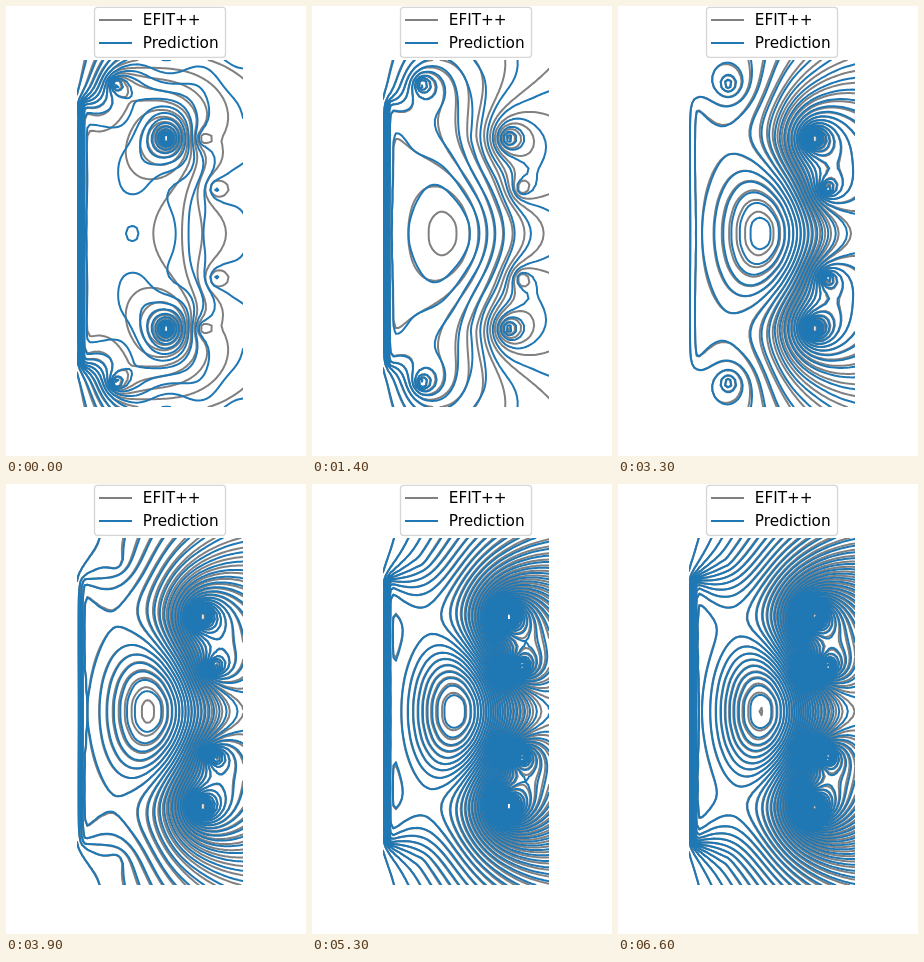
An HTML page with a canvas for the animation above (6.7 s loop, 300 by 450 pixels).

```html
<!DOCTYPE html>
<html lang="en">
<head>
<meta charset="utf-8">
<title>Flux contours</title>
<style>
  html, body { margin: 0; width: 100%; height: 100%; overflow: hidden; background: #fff; }
  canvas, svg { position: absolute; left: 0; top: 0; width: 300px; height: 450px; }
  text { font: 15.28px "DejaVu Sans", sans-serif; }
</style>
</head>
<body>
<canvas id="plot" width="300" height="450"></canvas>
<svg viewBox="0 0 300 450">
  <rect x="88.5" y="1.3" width="131" height="50" rx="3" fill="#fff" fill-opacity=".8" stroke="#ccc" stroke-opacity=".8" stroke-width="1.3"/>
  <path d="M93 14H126" stroke="#808080" stroke-width="2"/>
  <path d="M93 37H126" stroke="#1f77b4" stroke-width="2"/>
  <text x="136.8" y="19">EFIT++</text>
  <text x="136.8" y="42">Prediction</text>
</svg>
<script>
const LOOP = 6700, STEP = 100;
const BOX = { x: 71, y: 54, w: 166, h: 347 };
const N = 64, W = N + 1;
const GRAY = '#808080', BLUE = '#1f77b4';
const ctx = document.getElementById('plot').getContext('2d');

const gridR = i => 0.06 + 1.94 * i / N;
const gridZ = j => 2 - 4 * j / N;

// Flux of a circular current loop; elliptic integrals by the AGM.
function loopFlux(r, rc, dz2) {
  const m = 4 * r * rc / ((r + rc) ** 2 + dz2);
  let a = 1, b = Math.sqrt(1 - m), s = m / 2, p = 0.5;
  for (let n = 0; n < 6; n++) {
    const c = (a - b) / 2, g = Math.sqrt(a * b);
    a = (a + b) / 2;
    b = g;
    p *= 2;
    s += p * c * c;
  }
  const K = Math.PI / 2 / a, E = K * (1 - s);
  return Math.sqrt(r * rc / m) * ((2 - m) * K - 2 * E);
}

function makeGrid(value) {
  const grid = new Float64Array(W * W);
  for (let j = 0; j < W; j++)
    for (let i = 0; i < W; i++) grid[j * W + i] = value(gridR(i), gridZ(j));
  return grid;
}

// Sum of filaments [radius, height, weight]; 20 contour steps per unit of current.
const field = (filaments, soft) => makeGrid((r, z) => {
  let sum = 0;
  for (const [rc, zc, k] of filaments) sum += k * loopFlux(r, rc, (z - zc) ** 2 + soft * soft);
  return 20 * sum;
});

const coilPair = (r, z, soft) => field([[r, z, 1], [r, -z, 1]], soft);

function solenoid() {
  const turns = [];
  for (let n = -30; n <= 30; n++) turns.push([0.145, n / 20, 1]);
  const grid = field(turns, 0.02);
  const peak = grid[W * N / 2 + 3];
  return grid.map(v => v / peak);
}

// Elliptic current channel with a parabolic profile.
function plasma(r, a, b) {
  const parts = [];
  let total = 0;
  for (let u = -0.75; u < 1; u += 0.25)
    for (let v = -0.875; v < 1; v += 0.25) {
      const k = 1 - u * u - v * v;
      if (k <= 0) continue;
      parts.push([r + a * u, b * v, k]);
      total += k;
    }
  return field(parts.map(([x, z, k]) => [x, z, k / total]), 0.1);
}

const grids = {
  core: solenoid(),
  divertor: coilPair(0.515, 1.72, 0.025),
  startup: coilPair(1.1, 1.095, 0.025),
  outer: coilPair(1.525, 1.095, 0.035),
  inner: coilPair(1.68, 0.52, 0.03),
  young: plasma(0.74, 0.5, 0.85),
  mature: plasma(0.85, 0.55, 0.9),
  ripple: makeGrid((r, z) => r * (2 - r) * Math.sin(7 * r) * Math.cos(5 * z))
};

function ease(from, to, s) {
  const f = Math.min(1, Math.max(0, (s - from) / (to - from)));
  return f * f * (3 - 2 * f);
}

// Currents after s seconds: the solenoid swings over while plasma and outer coils ramp up.
function currentsAt(s) {
  const total = 0.24 * ease(0, 1.2, s) + 0.88 * ease(0.6, 6, s);
  const grown = ease(1.4, 3, s);
  return {
    core: 9.1 - 21.6 * ease(-0.2, 6.7, s),
    divertor: 0.28 - 0.26 * ease(2.2, 4.5, s),
    startup: 0.17 - 0.174 * ease(0, 1.4, s),
    outer: -0.045 - 0.29 * ease(0, 6.2, s),
    inner: -0.035 - 0.165 * ease(0.8, 6, s),
    young: total * (1 - grown),
    mature: total * grown,
    ripple: 0
  };
}

// The prediction lags a little in strength and starts out wavy.
function predict(currents, s) {
  const ratio = 0.9 + 0.07 * ease(2, 5, s);
  const out = { ...currents, ripple: 0.05 + 0.5 * Math.exp(-s / 1.2) };
  for (const name of ['outer', 'inner', 'young', 'mature']) out[name] *= ratio;
  return out;
}

function fluxMap(currents) {
  const map = new Float64Array(W * W);
  for (const name in grids) {
    const k = currents[name], grid = grids[name];
    if (k) for (let q = 0; q < map.length; q++) map[q] += k * grid[q];
  }
  return map;
}

// Contours at every half-integer level.
function contours(map, color) {
  const dx = BOX.w / N, dy = BOX.h / N;
  const line = (p, q) => {
    ctx.moveTo(p[0], p[1]);
    ctx.lineTo(q[0], q[1]);
  };
  ctx.beginPath();
  for (let j = 0; j < N; j++)
    for (let i = 0; i < N; i++) {
      const q = j * W + i;
      const a = map[q], b = map[q + 1], c = map[q + W + 1], d = map[q + W];
      const x = BOX.x + i * dx, y = BOX.y + j * dy;
      const top = Math.max(a, b, c, d);
      for (let v = Math.ceil(Math.min(a, b, c, d) - 0.5) + 0.5; v < top; v++) {
        const pts = [];
        const cut = (s, e) => (v - s) / (e - s);
        const splits = (s, e) => (s > v) !== (e > v);
        if (splits(a, b)) pts.push([x + dx * cut(a, b), y]);
        if (splits(b, c)) pts.push([x + dx, y + dy * cut(b, c)]);
        if (splits(d, c)) pts.push([x + dx * cut(d, c), y + dy]);
        if (splits(a, d)) pts.push([x, y + dy * cut(a, d)]);
        if (pts.length === 2) line(pts[0], pts[1]);
        if (pts.length === 4) {
          const joined = ((a + b + c + d) / 4 > v) === (a > v);
          line(pts[0], pts[joined ? 1 : 3]);
          line(pts[2], pts[joined ? 3 : 1]);
        }
      }
    }
  ctx.strokeStyle = color;
  ctx.stroke();
}

function draw(ms) {
  const s = ms / 1000, currents = currentsAt(s);
  ctx.clearRect(0, 0, 300, 450);
  contours(fluxMap(currents), GRAY);
  contours(fluxMap(predict(currents, s)), BLUE);
}

ctx.beginPath();
ctx.rect(BOX.x, BOX.y, BOX.w, BOX.h);
ctx.clip();
ctx.lineWidth = 2;
ctx.lineCap = 'round';

let shown = -1;
function tick() {
  const t = performance.now() % LOOP;
  const step = t < 2 * STEP ? 0 : Math.floor(t / STEP) * STEP;
  if (step !== shown) draw(shown = step);
  requestAnimationFrame(tick);
}
tick();
</script>
</body>
</html>
```
